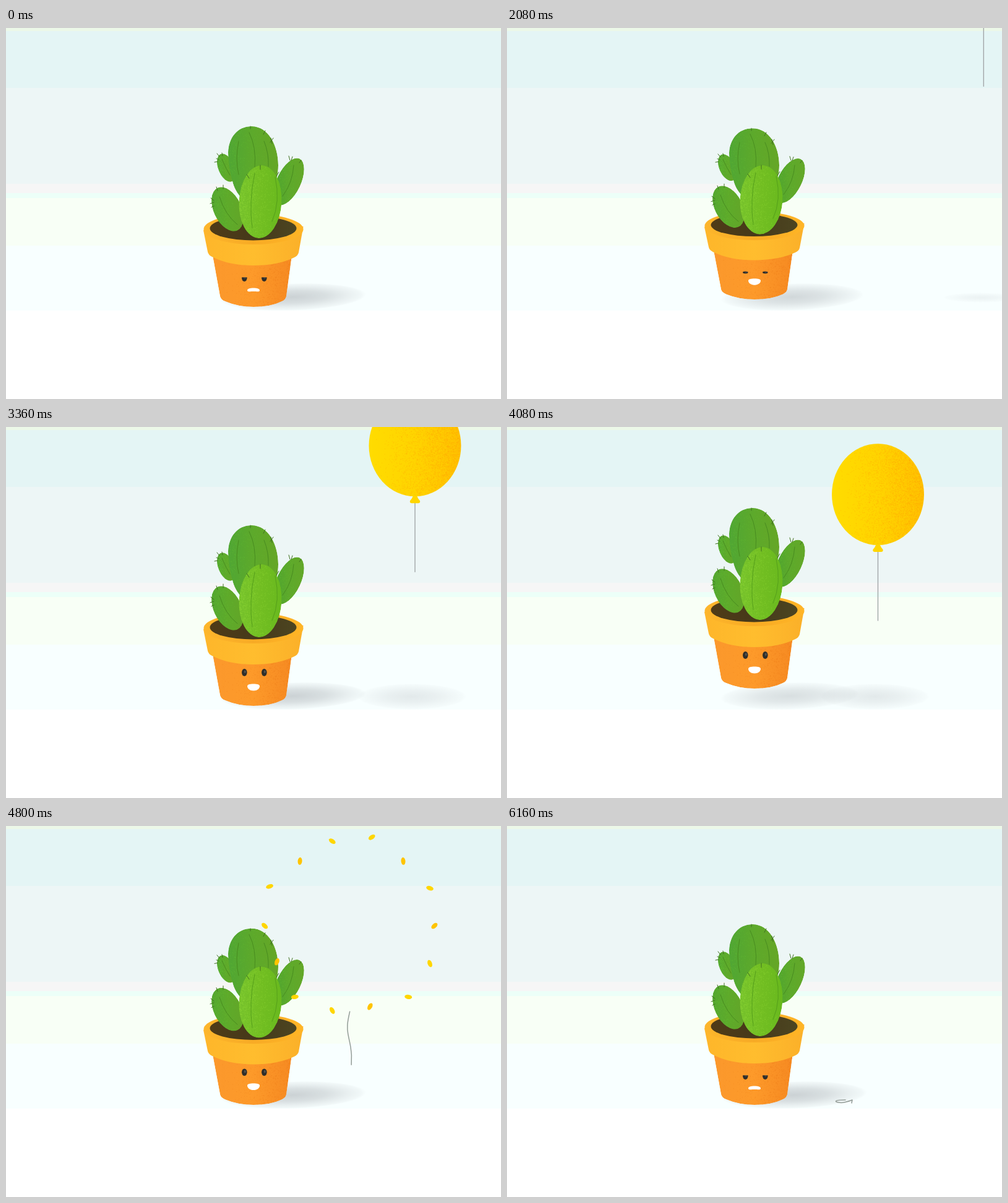
Write an HTML page with a canvas that moves like this. It is 800x600 px and loops after 7600 ms.

```html
<!DOCTYPE html>
<html lang="en">
<head>
<meta charset="utf-8">
<title>Cactus and balloon</title>
<style>
  html, body { margin: 0; width: 100%; height: 100%; overflow: hidden; background: #fff; }
  canvas { display: block; width: 800px; height: 600px; }
</style>
</head>
<body>
<canvas id="stage" width="800" height="600"></canvas>
<script>
const ctx = document.getElementById('stage').getContext('2d');
const LOOP = 7600, STEP = 80, GROUND = 450, POP = 4560;
const HOP_START = 1280, HOP = 520, HOP_END = HOP_START + 7 * HOP;

// [time, value] tables
const LIFT = [[0, 0], [40, 13], [80, 24], [150, 31], [200, 28], [280, 12], [325, 0], [520, 0]];
const SQUASH = [[0, 1], [40, .94], [80, .955], [200, 1], [280, .948], [350, .935], [440, 1.01], [520, 1]];
const SPLAY = [[0, 0], [80, 1], [200, 0], [280, 0], [360, -.3], [440, .3], [520, 0]];
const SETTLE = [[4920, 0], [5040, -.4], [5200, .35], [5360, .2], [5520, 0]];
const MOOD = [[400, 0], [960, 1], [5680, 1], [6160, 0]];
const BLINK = [[960, 0], [1080, 1], [1200, 0], [1920, 0], [2080, 1], [2240, 0]];

const lerp = (a, b, p) => a + (b - a) * p;
const clamp = v => Math.min(1, Math.max(0, v));

function at(table, t) {
  if (t <= table[0][0]) return table[0][1];
  for (let i = 1; i < table.length; i++) {
    const [t0, a] = table[i - 1], [t1, b] = table[i];
    if (t <= t1) return lerp(a, b, (t - t0) / (t1 - t0));
  }
  return table[table.length - 1][1];
}

let seed = 7;
function rnd() {
  seed = (seed * 16807) % 2147483647;
  return seed / 2147483647;
}

// Dots inside a unit disc, denser towards one side
function grain(count, side) {
  const dots = [];
  while (dots.length < count) {
    const x = rnd() * 2 - 1, y = rnd() * 2 - 1;
    if (x * x + y * y < .98 && rnd() < ((1 + side * x) / 2) ** 2) dots.push([x, y]);
  }
  return dots;
}

function speckle(dots, cx, cy, rx, ry, color) {
  ctx.fillStyle = color;
  for (const [x, y] of dots) ctx.fillRect(cx + x * rx, cy + y * ry, 1, 1);
}

function across(x0, x1, ...colors) {
  const g = ctx.createLinearGradient(x0, 0, x1, 0);
  colors.forEach((c, i) => g.addColorStop(i / (colors.length - 1), c));
  return g;
}

function oval(cx, cy, rx, ry, fill, rot = 0) {
  ctx.beginPath();
  ctx.ellipse(cx, cy, rx, ry, rot, 0, Math.PI * 2);
  ctx.fillStyle = fill;
  ctx.fill();
}

function stroke(d, color, width = 1) {
  ctx.strokeStyle = color;
  ctx.lineWidth = width;
  ctx.stroke(new Path2D(d));
}

function fillPath(d, fill) {
  ctx.fillStyle = fill;
  ctx.fill(new Path2D(d));
}

const BANDS = [
  [0, '#ecf8e8'], [5, '#e4f5f5'], [97, '#edf6f6'], [252, '#f6f6f6'],
  [267, '#ecfff8'], [275, '#f8fff6'], [352, '#f8ffff'], [457, '#ffffff']
];

function backdrop() {
  for (const [y, color] of BANDS) {
    ctx.fillStyle = color;
    ctx.fillRect(0, y, 800, 600 - y);
  }
}

function shadow(cx, cy, rx, ry, alpha, rot = 0) {
  ctx.save();
  ctx.translate(cx, cy);
  ctx.rotate(rot);
  ctx.scale(rx, ry);
  const g = ctx.createRadialGradient(0, 0, 0, 0, 0, 1);
  [[0, 1], [.45, .7], [.75, .35], [.93, .15], [1, 0]].forEach(([p, k]) =>
    g.addColorStop(p, `rgba(70,75,85,${alpha * k})`));
  oval(0, 0, 1, 1, g);
  ctx.restore();
}

const POT_BODY = 'M334 368 L346 434 Q347 439 354 442 Q375 451 400 451 Q428 451 446 442 Q452 439 453 434 L462 368 Z';
const POT_RIM = 'M319 327 L326 362 Q327 367 333 370 Q360 384 400 384 Q440 384 466 371 Q472 368 473 363 L480.500 321 Z';
const potGrain = grain(800, 1);

function pot() {
  ctx.save();
  ctx.clip(new Path2D(POT_BODY));
  fillPath(POT_BODY, across(334, 462, '#fb982c', '#fd9a2a', '#f68a22'));
  speckle(potGrain, 398, 405, 66, 60, 'rgba(235,120,25,.3)');
  ctx.restore();
  fillPath(POT_RIM, across(319, 480, '#feb62a', '#ffbd2e', '#fbb029'));
  oval(400, 325.500, 80.500, 24.500, across(319, 480, '#fdb62c', '#f8ab25', '#ffb526'));
  oval(399.500, 324, 70, 19.500, across(330, 469, '#4f3b17', '#46391a', '#4c4521'));
}

const LEAF = ['#55a830', '#5eaa2a', '#62a628'];
const PARTS = [
  { c: [356, 226], r: [13, 24], rot: -22, pivot: [367, 248], tilt: -6, fill: LEAF,
    lines: 'M349 212 Q355 227 362 238', ticks: 'M341 203 L345 208 M349 202 L350 207 M337 217 L342 216 M340 211 L344 213' },
  { c: [457, 248.500], r: [19.500, 41], rot: 25, pivot: [443, 288], tilt: 3, fill: ['#50a52e', '#5da92b', '#62a829'],
    lines: 'M465 222 Q463 251 447 272', ticks: 'M457 207 L459 214 M463 208 L461 214 M477 214 L474 218' },
  { c: [399, 215], r: [41, 56], rot: 0, pivot: [400, 300], tilt: -1, fill: ['#4fa634', '#5da92b', '#65a626'],
    shape: 'M397 159 C424 159 440 190 440 222 C440 252 425 278 402 286 C382 282 370 265 366 248 C361 232 359 212 359 201 C360 178 373 159 397 159 Z',
    lines: 'M393 169 Q405 193 402 226 M376 183 Q370 212 376 237 M417 183 Q425 202 424 224',
    ticks: 'M419 166 L416 172 M432 178 L427 185 M428 178 L430 187 M395 159 L395 163' },
  { c: [358, 293], r: [22.500, 38], rot: -25, pivot: [375, 325], tilt: -4, fill: LEAF,
    lines: 'M345 273 Q354 302 374 318', ticks: 'M331 275 L336 279 M330 284 L336 282 M340 257 L342 263 M351 254 L351 260 M332 290 L336 288' },
  { c: [411, 281], r: [34.500, 59], rot: 3, pivot: [409, 338], tilt: 4, fill: ['#76c22c', '#72be22', '#69b91e'], light: true,
    lines: 'M402 235 Q392 280 398 324 M435 241 Q444 281 430 313',
    ticks: 'M389 237 L393 243 M411 222 L411 229 M441 233 L437 240' }
];
PARTS.forEach(p => { p.dots = grain(p.light ? 1100 : 300, -1); });

function cactus(splay) {
  for (const p of PARTS) {
    const [cx, cy] = p.c, [rx, ry] = p.r, [px, py] = p.pivot;
    ctx.save();
    ctx.translate(px, py);
    ctx.rotate(p.tilt * splay * Math.PI / 180);
    ctx.translate(-px, -py);
    const shape = new Path2D(p.shape);
    if (!p.shape) shape.ellipse(cx, cy, rx, ry, p.rot * Math.PI / 180, 0, Math.PI * 2);
    ctx.save();
    ctx.clip(shape);
    ctx.fillStyle = across(cx - rx, cx + rx, ...p.fill);
    ctx.fill(shape);
    speckle(p.dots, cx, cy, rx + 4, ry, p.light ? 'rgba(150,222,60,.42)' : 'rgba(105,195,55,.4)');
    ctx.restore();
    stroke(p.lines, p.light ? '#559f1b' : '#488c20');
    stroke(p.ticks, '#3f7020');
    ctx.restore();
  }
}

function face(mood, blink) {
  const cy = lerp(lerp(404, 397, mood), 405, blink);
  const ry = lerp(6, 2, blink);
  const lid = lerp(lerp(403.300, 389, mood), 402, blink);
  ctx.save();
  ctx.beginPath();
  ctx.rect(375, lid, 50, 30);
  ctx.clip();
  for (const x of [385.300, 417.300]) {
    oval(x, cy, 4.300, ry, '#302e2a');
    oval(x + 1, cy - ry * .2, 1.500, ry * .4, '#53534f');
  }
  ctx.restore();

  const mid = lerp(424.500, 419, mood), top = lerp(420.500, 415.500, mood);
  const low = lerp(427, 423, mood), base = lerp(426, 426.500, mood);
  fillPath(`M390 ${mid} C390 ${top + 1} 394 ${top} 400 ${top} C406 ${top} 410 ${top + 1} 410 ${mid}
    C410 ${low} 406 ${base} 400 ${base} C394 ${base} 390 ${low} 390 ${mid} Z`, '#fff');
}

const balloonX = t => 599.500 - (t - 4080) * .0854;
const balloonEnd = t => 313 + (t - 4080) * .1094;
const balloonGrain = grain(4200, 1);

function balloon(t) {
  const x = balloonX(t), end = balloonEnd(t), cy = end - 204;
  stroke(`M${x} ${cy + 90} V${end}`, '#a2a6a8', 1.400);
  oval(x, cy, 74.500, 82, across(x - 75, x + 75, '#ffdc00', '#ffd400', '#ffc400'));
  speckle(balloonGrain, x, cy, 74, 81, 'rgba(255,170,0,.42)');
  const y = cy + 81;
  fillPath(`M${x - 3} ${y} Q${x - 5} ${y + 5} ${x - 8} ${y + 8} Q${x - 9} ${y + 12} ${x - 5} ${y + 12}
    H${x + 5} Q${x + 9} ${y + 12} ${x + 8} ${y + 8} Q${x + 5} ${y + 5} ${x + 3} ${y} Z`, '#ffd600');
}

function scraps(t) {
  const p = (t - POP) / 320;
  if (p < 0 || p > 1) return;
  const x = balloonX(POP), y = balloonEnd(POP) - 204;
  for (let i = 0; i < 14; i++) {
    const a = i * Math.PI / 7, r = lerp(72, 138 + i % 3 * 7, 1 - (1 - p) ** 2);
    ctx.save();
    ctx.translate(x + Math.cos(a) * r, y + Math.sin(a) * r);
    ctx.rotate(a + p * (i % 2 ? 1 : -1));
    oval(0, 0, lerp(15, 3, p), lerp(8, 2, p), i % 3 ? '#ffd600' : '#ffc400');
    ctx.restore();
  }
}

const HEAP = [[547, 443], [534, 443], [530, 446], [541, 448], [553, 445], [558, 443], [557, 448]];

function looseString(t) {
  const p = clamp((t - POP) / 480) ** 2;
  const x = balloonX(POP), y = balloonEnd(POP) - 113;
  const pts = HEAP.map(([hx, hy], i) => [lerp(x, hx, p), lerp(y + i * 113 / 6, hy, p)]);
  let d = `M${pts[0]}`;
  for (let i = 1; i < 5; i++) {
    const [a, b] = [pts[i], pts[i + 1]];
    d += ` Q${a} ${(a[0] + b[0]) / 2} ${(a[1] + b[1]) / 2}`;
  }
  stroke(`${d} L${pts[5]} L${pts[6]}`, '#939c97', 1.500);
}

function draw(t) {
  const hopping = t >= HOP_START && t < HOP_END;
  const phase = hopping ? (t - HOP_START) % HOP : 0;
  const lift = at(LIFT, phase);
  const splay = hopping ? at(SPLAY, phase) : at(SETTLE, t);

  backdrop();
  shadow(464 - lift * .25, 435, 118 - lift * .2, 22, .25 - lift * .0025, -.035);
  if (t > HOP_START && t < POP) {
    const near = clamp((t - 1600) / 1760);
    shadow(balloonX(t) - 5, 436, lerp(50, 88, near), lerp(3, 21, near), lerp(.05, .12, near));
  }

  ctx.save();
  ctx.translate(0, GROUND - lift);
  ctx.scale(1, at(SQUASH, phase));
  ctx.translate(0, -GROUND);
  pot();
  cactus(splay);
  face(at(MOOD, t), at(BLINK, t));
  ctx.restore();

  if (t >= POP) {
    looseString(t);
    scraps(t);
  } else if (t > HOP_START) {
    balloon(t);
  }
}

ctx.lineCap = ctx.lineJoin = 'round';
const start = performance.now();
let last = -1;
function tick() {
  const t = Math.floor(((performance.now() - start) % LOOP) / STEP) * STEP;
  if (t !== last) draw(last = t);
  requestAnimationFrame(tick);
}
tick();
</script>
</body>
</html>
```
